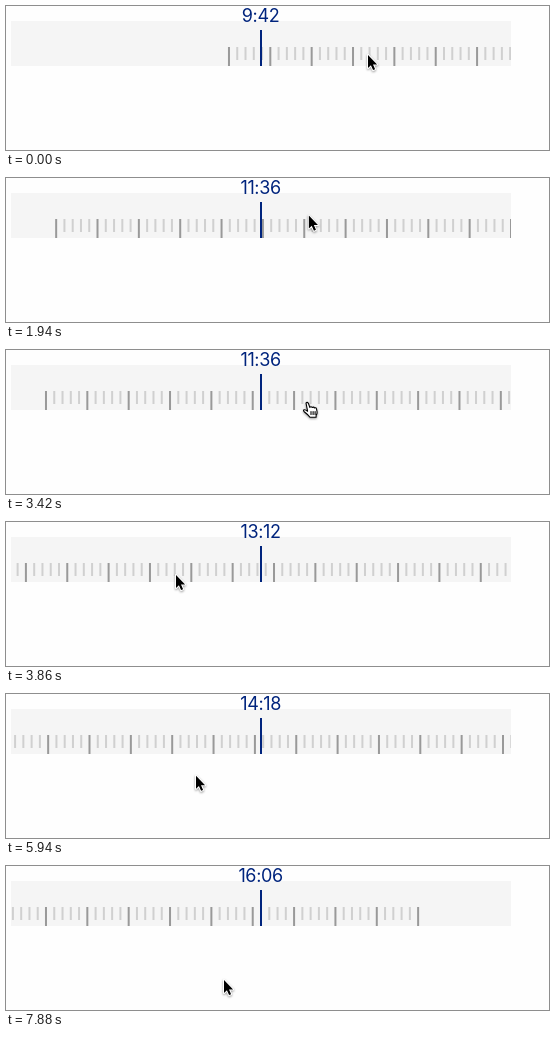
An HTML page that plays this animation: 543 px wide and 144 px high, repeating every 8 s.

```html
<!DOCTYPE html>
<html lang="en">
<head>
<meta charset="utf-8">
<title>Time ruler</title>
<style>
  html, body { margin: 0; width: 100%; height: 100%; overflow: hidden; background: #fefefe; }
  svg { display: block; width: 543px; height: 144px; }
  text { font: 18px Inter, "Liberation Sans", sans-serif; letter-spacing: -.35px; fill: #00247d; text-anchor: middle; }
  #pointer { stroke-linejoin: round; stroke-linecap: round; filter: drop-shadow(0 1px 1px #0006); }
  #arrow { stroke: #fff; stroke-width: 2; paint-order: stroke; }
  #hand { fill: #fff; stroke: #000; stroke-width: 1.1; }
</style>
</head>
<body>
<svg viewBox="0 0 543 144">
  <clipPath id="bar"><rect x="5" y="15" width="500" height="45"/></clipPath>
  <rect x="5" y="15" width="500" height="45" fill="#f5f5f5"/>
  <g clip-path="url(#bar)"><g id="ruler"></g></g>
  <rect x="254" y="24" width="2" height="36" fill="#00247d"/>
  <text id="label" x="254.6" y="16"></text>
  <g id="pointer">
    <path id="arrow" d="M1 2v13l2.9-2.8 2.2 4.9 2-.9-2.1-4.7h4.1z"/>
    <path id="hand" d="M2 2q1.3-1.4 2.4.4l1.4 4q1.2-1.3 2.4.1 1.3-1 2.3.4 1.5-.6 2 .9l.6 3.2q.2 1.9-1 3.5v1.8H6Q4.3 13.8.5 11q-1.7-1.5-.5-2.2 1.2-.5 3.6 1.4zM7 10.5v3M9.1 10.5v3M11.1 10.5v3"/>
  </g>
</svg>
<script>
const LOOP = 8000, STEP = 148.6, TICK = 8.27, CENTER = 255;
const OPENING = 9 * 60, MINUTES = 6, TICKS = 90;
const LAG = 0.67; // steps the ruler trails behind the label

// Moves follow one another; a drag carries the ruler along by whole ticks.
const start = { x: 419, y: 50, ticks: 0 };
const moves = [];
const move = (dragging, from, to, x, y) => {
  const before = moves.length ? moves[moves.length - 1].after : start;
  const ticks = before.ticks + (dragging ? Math.round((before.x - x) / TICK) : 0);
  moves.push({ dragging, from, to, before, after: { x, y, ticks } });
};
const drag = (...args) => move(true, ...args);
const hover = (...args) => move(false, ...args);

drag(-1.5, 3, 245, 41);
hover(3, 5, 347, 28);
hover(5, 7, 267, 29);
hover(7, 9, 342, 29);
drag(10, 16.8, 251, 44);
drag(18, 20, 298, 51);
drag(23, 26, 169, 51);
hover(31.8, 36, 282, 52);
drag(37, 41, 158, 89);
hover(42, 45, 299, 53);
drag(46, 50, 184, 101);
hover(52, 53, 217, 112);

const grabbing = step => step >= 20 && step < 26;
const smooth = u => u * u * (3 - 2 * u);
const $ = id => document.getElementById(id);

function poseAt(step) {
  const current = moves.findLast(m => m.from <= step) || moves[0];
  const { dragging, from, to, before, after } = current;
  const linear = Math.min(1, Math.max(0, (step - from) / (to - from)));
  const u = dragging ? linear : smooth(linear);
  const mix = key => before[key] + (after[key] - before[key]) * u;
  return { x: mix("x"), y: mix("y"), ticks: mix("ticks") };
}

for (let i = 0; i <= TICKS; i++) {
  const major = i % 5 === 0;
  const tick = document.createElementNS("http://www.w3.org/2000/svg", "rect");
  const attributes = { x: i * TICK - 1, y: 41, width: 2, height: major ? 19 : 13,
    fill: major ? "#999" : "#d0d0d0" };
  for (const name in attributes) tick.setAttribute(name, attributes[name]);
  $("ruler").append(tick);
}

function render(now) {
  const step = Math.floor((now % LOOP + 8) / STEP);
  const { x, y, ticks } = poseAt(step);
  const minutes = OPENING + MINUTES * Math.round(ticks);
  $("label").textContent = Math.floor(minutes / 60) + ":" + String(minutes % 60).padStart(2, "0");

  const offset = CENTER - TICK * poseAt(step - LAG).ticks;
  $("ruler").setAttribute("transform", `translate(${offset})`);
  $("pointer").setAttribute("transform", `translate(${x} ${y})`);
  $("hand").style.display = grabbing(step) ? "" : "none";
  $("arrow").style.display = grabbing(step) ? "none" : "";
}

const began = performance.now();
function loop() {
  render(performance.now() - began);
  requestAnimationFrame(loop);
}
loop();
</script>
</body>
</html>
```
